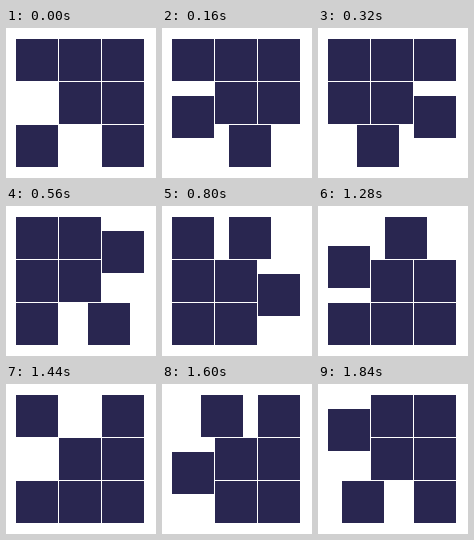
Recreate the animation shown at these times as an HTML page with a canvas. Size 150 by 150 pixels, loop 1920 ms.

```html
<!DOCTYPE html>
<html lang="en">
<head>
<meta charset="utf-8">
<title>Sliding squares loader</title>
<style>
  html, body { margin: 0; width: 100%; height: 100%; overflow: hidden; background: #fff; }
  canvas { display: block; }
</style>
</head>
<body>
<canvas id="stage" width="150" height="150"></canvas>
<script>
const ctx = document.getElementById('stage').getContext('2d');
const LEFT = 10, TOP = 11, SIZE = 42, PITCH = 43;
const TICK = 80, TICKS_PER_MOVE = 3, MOVES = 8;

// Outer cells clockwise from the top left, as [column, row]
const RING = [[0, 0], [1, 0], [2, 0], [2, 1], [2, 2], [1, 2], [0, 2], [0, 1]];
const wrap = i => (i + 8) % 8;

function square(col, row) {
  ctx.fillRect(Math.round(LEFT + col * PITCH), Math.round(TOP + row * PITCH), SIZE, SIZE);
}

function draw(time) {
  const tick = Math.floor(time / TICK) % (MOVES * TICKS_PER_MOVE);
  const move = Math.floor(tick / TICKS_PER_MOVE);
  const part = tick % TICKS_PER_MOVE / TICKS_PER_MOVE;
  // Two gaps travel anticlockwise; the square behind each one slides into it
  const gaps = [wrap(7 - move), wrap(5 - move)];

  ctx.fillStyle = '#fff';
  ctx.fillRect(0, 0, 150, 150);
  ctx.fillStyle = '#292650';
  square(1, 1);
  RING.forEach(([col, row], i) => {
    if (gaps.includes(i)) return;
    const next = wrap(i + 1);
    const shift = gaps.includes(next) ? part : 0;
    const [nextCol, nextRow] = RING[next];
    square(col + (nextCol - col) * shift, row + (nextRow - row) * shift);
  });
}

const start = performance.now();
function loop() {
  draw(performance.now() - start);
  requestAnimationFrame(loop);
}
loop();
</script>
</body>
</html>
```
